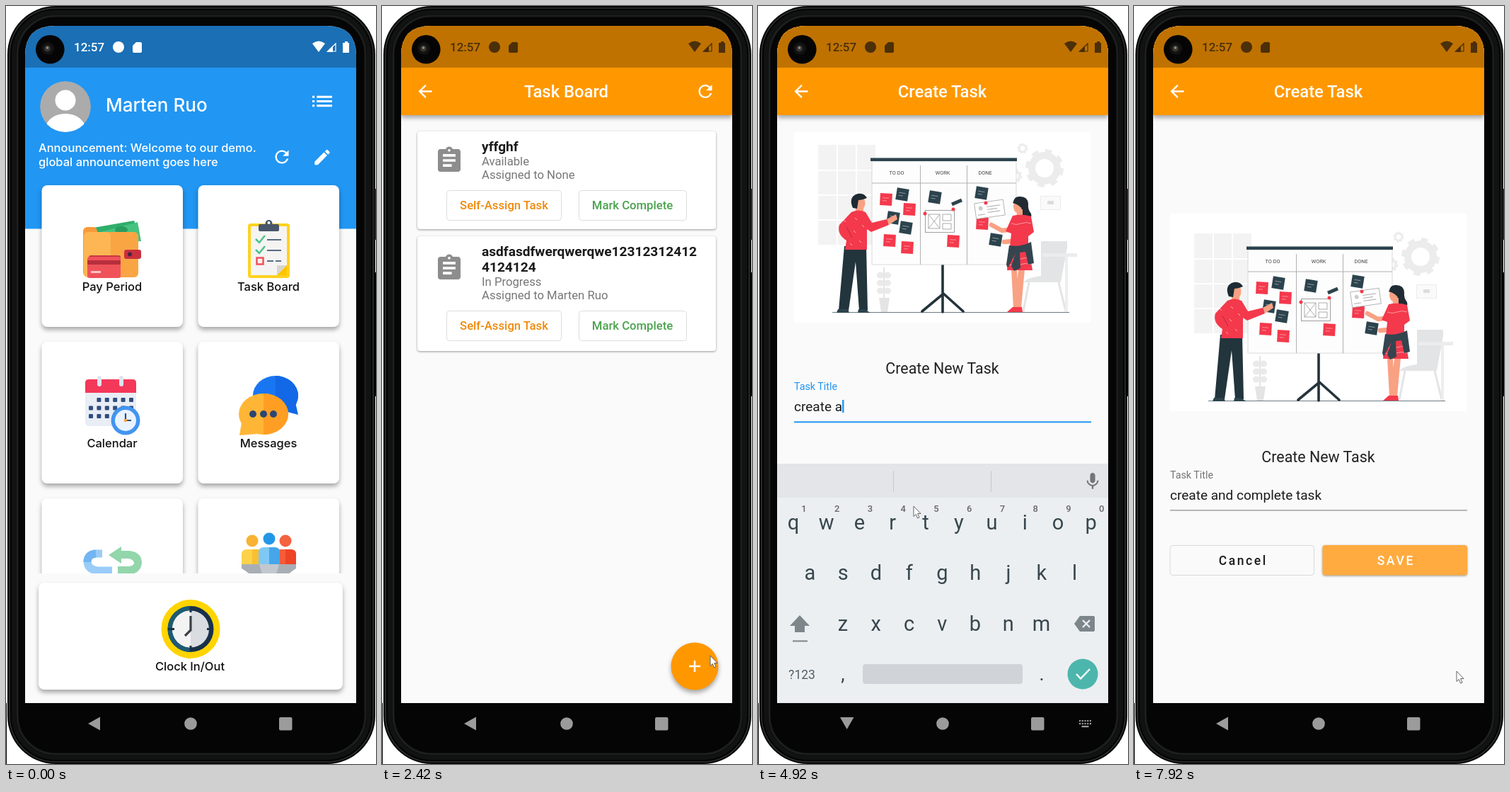
Write an HTML page that moves like this. It is 523 px wide and 1070 px high and loops after 8000 ms.

```html
<!DOCTYPE html>
<html lang="en">
<head>
<meta charset="utf-8">
<title>Task board demo</title>
<style>
  html, body { margin: 0; width: 100%; height: 100%; overflow: hidden; background: #fff; }
  svg { display: block; width: 100vw; height: 100vh; font-family: Roboto, sans-serif; }
  .inter { font-family: Inter, sans-serif; }
  .low { filter: drop-shadow(0 1.5px 1.5px #0006); }
  .high { filter: drop-shadow(0 4px 3px #0005); }
  .mid { text-anchor: middle; }
  .b5 { font-weight: 500; }
  .b7 { font-weight: 700; }
</style>
</head>
<body>
<svg id="stage" viewBox="0 0 523 1070" xmlns="http://www.w3.org/2000/svg"></svg>
<script>
const R = (x, y, w, h, fill, rx = 0, more = '') =>
  `<rect x="${x}" y="${y}" width="${w}" height="${h}" rx="${rx}" fill="${fill}" ${more}/>`;
const C = (x, y, r, fill, more = '') => `<circle cx="${x}" cy="${y}" r="${r}" fill="${fill}" ${more}/>`;
const E = (x, y, rx, ry, fill) => `<ellipse cx="${x}" cy="${y}" rx="${rx}" ry="${ry}" fill="${fill}"/>`;
const P = (d, fill, more = '') => `<path d="${d}" fill="${fill}" ${more}/>`;
const L = (d, color, w = 1, more = '') => P(d, 'none', `stroke="${color}" stroke-width="${w}" ${more}`);
const T = (x, y, size, text, fill, cls = '', more = '') =>
  `<text x="${x}" y="${y}" font-size="${size}" fill="${fill}" class="${cls}" ${more}>${text}</text>`;
const G = (inner, more = '') => `<g ${more}>${inner}</g>`;
const icon = (d, cx, cy, scale, fill) =>
  P(d, fill, `transform="translate(${cx} ${cy}) scale(${scale}) translate(-12 -12)"`);
const each = (list, fn) => [...list].map(fn).join('');

const ICON = {
  refresh: 'M17.65 6.35C16.2 4.9 14.21 4 12 4c-4.42 0-7.99 3.58-7.99 8s3.57 8 7.99 8c3.73 0 6.84-2.55 7.73-6h-2.08c-.82 2.33-3.04 4-5.65 4-3.31 0-6-2.69-6-6s2.69-6 6-6c1.66 0 3.14.69 4.22 1.78L13 11h7V4z',
  edit: 'M3 17.25V21h3.75L17.81 9.94l-3.75-3.75zM20.71 7.04c.39-.39.39-1.02 0-1.41l-2.34-2.34c-.39-.39-1.02-.39-1.41 0l-1.83 1.83 3.75 3.75z',
  back: 'M20 11H7.83l5.59-5.59L12 4l-8 8 8 8 1.41-1.41L7.83 13H20z',
  list: 'M3 7h2v2H3zM3 11h2v2H3zM3 15h2v2H3zM7 7h14v2H7zM7 11h14v2H7zM7 15h14v2H7z',
  task: 'M19 3h-4.18C14.4 1.84 13.3 1 12 1s-2.4.84-2.82 2H5c-1.1 0-2 .9-2 2v14c0 1.1.9 2 2 2h14c1.1 0 2-.9 2-2V5c0-1.1-.9-2-2-2zm-7 0c.55 0 1 .45 1 1s-.45 1-1 1-1-.45-1-1 .45-1 1-1zm2 14H7v-2h7zm3-4H7v-2h10zm0-4H7V7h10z',
  mic: 'M12 14c1.66 0 3-1.34 3-3V5c0-1.66-1.34-3-3-3S9 3.34 9 5v6c0 1.66 1.34 3 3 3zm5.3-3c0 3-2.54 5.1-5.3 5.1S6.7 14 6.7 11H5c0 3.41 2.72 6.23 6 6.72V21h2v-3.28c3.28-.48 6-3.3 6-6.72z'
};
const USER = 'Marten Ruo', TYPED = 'create and complete task';

function phone() {
  const ring = (inset, color, w) => R(2 + inset, inset, 520 - 2 * inset, 1070 - 2 * inset, 'none', 68 - inset,
    `stroke="${color}" stroke-width="${w}"`);
  return R(2, 0, 520, 1070, '#050505', 68) + ring(3, '#303232', 1.5) + ring(9, '#111212', 6) + ring(14, '#1d1e1e', 3)
    + R(0, 984, 1, 86, '#000') + R(521, 258, 2, 72, '#222') + R(521, 376, 2, 175, '#000');
}

function wallet() {
  return P('M118 314L181 303L190 329L126 334Z', '#2fae6b') + P('M134 319L186 305L191 332L140 335Z', '#46c380')
    + E(163, 316, 9, 5, '#2a9c5e') + R(109, 312, 20, 70, '#f79a3a', 6)
    + R(110, 319, 77, 64, '#f9a544', 6) + R(110, 319, 38, 64, '#fcb653', 6)
    + R(117, 352, 45, 26, '#c93843', 3) + R(115, 354, 47, 30, '#f0525a', 3)
    + R(115, 359, 47, 6, '#b72f3d') + R(120, 374, 14, 3, '#ffc4c4')
    + R(167, 344, 24, 13, '#c9303e', 3) + C(175, 350.5, 3, '#4b2440');
}
function clipboard() {
  return R(342, 307, 59, 77, '#ffd21f', 4) + P('M346 311H397V366L383 380H346Z', '#f5f4f2')
    + P('M383 380V366H397Z', '#d8d5d1') + P('M397 366V380H383Z', '#ffc400')
    + R(357, 308, 29, 10, '#48566b', 2) + C(371.5, 307, 5, '#48566b') + C(371.5, 306, 2, '#fff')
    + each([329, 344], y => L(`M353 ${y}L358 ${y + 5}L366 ${y - 5}`, '#4cc38a', 2.5))
    + R(354.5, 355.5, 9, 9, 'none', 0, 'stroke="#f0525a" stroke-width="2.5"')
    + L('M369 330H389M369 345H389M369 360H378M381 360H389', '#5a6c86', 2);
}
function calendar() {
  let dots = '';
  for (let r = 0; r < 3; r++) for (let c = 0; c < 6; c++)
    if (r || c) dots += R(117 + c * 11.4, 553 + r * 11.5, 6, 6, '#2f4d7d', 1);
  return R(112, 528, 72, 65, '#e9edf5', 5) + P('M112 546V532Q112 527 117 527H179Q184 527 184 532V546Z', '#f4385a')
    + each([132, 163], x => R(x - 3, 522, 6, 15, '#dfe5ef', 3)) + dots
    + C(169, 585, 20.5, '#4394f0') + C(169, 585, 15, '#e9f3ff')
    + L('M169 575V585H177', '#2f4d7d', 2.2) + C(169, 585, 2.3, '#f4a63c');
}
function messages() {
  return E(381, 550, 32, 28, '#1976f3') + P('M394 572L413 577L408 555Z', '#1268e6')
    + P('M381 522A32 28 0 0 1 381 578Z', '#1268e6')
    + E(364, 576, 35, 29, '#ffb636') + P('M330 606L334 582L355 604Z', '#ffb636')
    + P('M364 547A35 29 0 0 1 364 605Z', '#ff9e23') + each([349, 364, 378], x => C(x, 576, 5, '#2b4673'));
}
function swap() {
  return L('M136 773H127Q115 774 115 785Q116 796 130 797H150', '#9accf8', 11)
    + L('M127 773Q115 774 115 785', '#72b5f2', 11)
    + P('M145 775L163 763V769H174Q192 771 192 786Q191 799 178 802H158V791H174Q181 790 181 786Q180 781 173 780H163V787Z', '#93d6ab');
}
function team() {
  const person = (x, y, head, body, shade, w) => C(x, y, 8.5, head)
    + P(`M${x - w} ${y + 36}V${y + 19}Q${x - w} ${y + 12} ${x - w + 8} ${y + 12}H${x + w - 8}Q${x + w} ${y + 12} ${x + w} ${y + 19}V${y + 36}Z`, body)
    + P(`M${x} ${y + 12}H${x + w - 8}Q${x + w} ${y + 12} ${x + w} ${y + 19}V${y + 36}H${x}Z`, shade);
  return person(348, 755, '#f9b233', '#fbd24a', '#f9c02f', 15) + person(395, 755, '#f4623f', '#f75b39', '#ee4527', 15)
    + person(372, 752, '#2397e6', '#7fc8f5', '#45a6ea', 15)
    + P('M333 788H410V794Q398 801 394 810H350Q346 801 333 794Z', '#a9aeb5') + P('M358 788H386L382 802H362Z', '#c3c8ce');
}
function clock() {
  return C(261, 879.5, 41.5, '#ffd400') + C(261, 879.5, 32.5, '#18304a') + P('M261 847A32.5 32.5 0 0 0 261 912Z', '#1d5b73')
    + C(261, 879.5, 26, '#d9dce0') + P('M261 853.5A26 26 0 0 0 261 905.5Z', '#f3f3f3')
    + L('M261 848V856M261 903V911M229 879.5H238M284 879.5H293', '#18304a', 3)
    + L('M261 861V881L253 889', '#3b3f46', 3.2);
}

function home() {
  const card = (x, y, art, label) => R(x, y, 199.5, 200, '#fff', 8, 'class="high"') + art
    + T(x + 99.5, y + 149, 16.5, label, '#111', 'inter mid b5');
  return R(27, 28, 468, 956, '#fafafa') + R(27, 86, 468, 228.5, '#2196f3') + R(27, 28, 468, 59, '#1a6fb5')
    + G(C(84, 142, 36, '#ababab') + C(84, 133, 14.5, '#fff') + E(84, 173, 28, 21, '#fff'), 'clip-path="url(#face)"')
    + T(141, 148.5, 26, USER, '#fff', 'inter b5')
    + T(46, 206, 16.5, 'Announcement: Welcome to our demo.', '#fff', 'inter b5')
    + T(46, 226, 16.5, 'global announcement goes here', '#fff', 'inter b5')
    + icon(ICON.list, 447, 134.5, 1.55, '#fff')
    + icon(ICON.refresh, 390, 213, 1.19, '#fff') + icon(ICON.edit, 447, 213.5, 1.19, '#fff')
    + G(card(50.5, 253, wallet(), 'Pay Period') + card(271.5, 253, clipboard(), 'Task Board')
      + card(50.5, 474, calendar(), 'Calendar') + card(271.5, 474, messages(), 'Messages')
      + card(50.5, 695, swap(), '') + card(271.5, 695, team(), ''), 'clip-path="url(#list)"')
    + R(46, 814, 430, 151, '#fff', 8, 'class="high"') + clock()
    + T(260, 938, 16.5, 'Clock In/Out', '#111', 'inter mid b5');
}

const bar = title => R(27, 28, 468, 126, '#ff9800', 0, 'class="high"') + R(27, 28, 468, 59, '#bf7200')
  + icon(ICON.back, 61, 120.5, 1.19, '#fff') + T(260.5, 129, 23.8, title, '#fff', 'mid b5');

function board() {
  const task = (y, h, names, state, who) => {
    const n = y + 27 + (names.length - 1) * 22, edge = 'stroke="#ddd"';
    return R(50, y, 422, h, '#fff', 4, 'class="low"') + icon(ICON.task, 95, y + 41 + (names.length - 1) * 4, 1.78, '#8d8d8d')
      + each(names, (s, i) => T(141, y + 28 + i * 22, 19.1, s, '#1b1b1b', 'b7'))
      + T(141, n + 21, 16.7, state, '#777') + T(141, n + 40, 16.7, 'Assigned to ' + who, '#777')
      + R(91.5, n + 56.5, 162, 42, '#fff', 4, edge) + R(278.5, n + 56.5, 152, 42, '#fff', 4, edge)
      + T(172.5, n + 83, 16.7, 'Self-Assign Task', '#ef8a0c', 'mid b5')
      + T(354, n + 83, 16.7, 'Mark Complete', '#4ba34f', 'mid b5');
  };
  return R(27, 28, 468, 956, '#fafafa') + bar('Task Board') + icon(ICON.refresh, 457, 120.5, 1.19, '#fff')
    + task(177, 138, ['yffghf'], 'Available', 'None')
    + task(325, 162, ['asdfasdfwerqwerqwe12312312412', '4124124'], 'In Progress', USER)
    + C(442, 932, 33.5, '#ff9800', 'class="high"') + L('M434 932H450M442 924V940', '#fff', 2.4);
}

function picture() {
  const red = '#f4394c', ink = '#2c434d', pale = '#ececec', skin = '#f9a183';
  const gear = (x, y, r, w) => C(x, y, r, 'none', `stroke="${pale}" stroke-width="${w}"`)
    + C(x, y, r + w * .65, 'none', `stroke="${pale}" stroke-width="${w * .5}" stroke-dasharray="${(r + w * .65) * Math.PI / 8}"`);
  const note = (fill, tilt) => ([x, y]) => G(R(x - 8.5, y - 8.5, 17, 17, fill)
    + L(`M${x - 5} ${y - 2}h9M${x - 5} ${y + 2}h6`, '#fff8', .8), `transform="rotate(${tilt} ${x} ${y})"`);
  const round = 'stroke-linecap="round" stroke-linejoin="round"';
  const man = P('M122 464H153L155 555H143L138 486L128 555H114Z', '#22343c')
    + P('M113 553H127L129 558H111ZM142 553H150L159 558H141Z', ink)
    + P('M138 405H149V418H138Z', skin) + E(145, 403, 6.5, 9.5, skin)
    + P('M134 410Q128 396 138 391Q149 387 154 396Q147 399 142 399L140 411Z', '#1e2b33')
    + P('M132 416Q142 411 152 416L161 431L182 426L185 434L160 444L154 440L154 469H123L125 456Q111 447 115 434Z', red)
    + L('M125 437L133 452', '#b92a3c') + L('M121 427l3 3M137 424l3 3M147 434l3 3M135 442l3 3M143 456l3 3M130 460l3 3', '#ffb3b8')
    + P('M182 426L195 419L197 426L185 434Z', skin);
  const woman = P('M361 402Q362 393 371 394Q381 394 382 404Q381 412 386 418Q388 425 381 427Q372 426 370 418Z', '#202b33')
    + P('M366 412H374V424H366Z', skin) + E(367, 408, 6, 9, skin) + P('M360 403Q364 394 376 398L375 414Q371 406 360 403Z', '#202b33')
    + L('M362 440L345 442L330 434M384 438L371 456L348 458', skin, 6.5, round)
    + P('M358 497H366L369 551H361ZM368 497H377L372 551H363Z', skin) + P('M360 550H373L374 557H352Z', red)
    + P('M360 421Q374 418 386 422L390 444L382 450V462L388 498H352L356 466L358 446L350 443Z', red)
    + L('M358 432q7 3 14 0t14 0M356 482q8 3 15 0t15 0M354 490q8 3 16 0t16 0', '#ffb0b6', .8)
    + P('M355 463Q370 466 386 458L390 488L382 490L378 472L370 473L371 495L362 499L358 492L364 474L353 495L351 490Z', '#34454f');
  return R(51, 293, 419.5, 279, '#fff')
    + R(85, 321, 81, 141, '#f3f3f3') + L('M112 321V462M139 321V462M85 357H166M85 392H166M85 427H166', '#fff', 2)
    + gear(405, 354, 18, 10) + gear(374, 326, 5, 3) + gear(364, 365, 6, 4)
    + R(399.5, 393.5, 28, 19, '#fafafa', 0, `stroke="${pale}"`) + R(409, 400, 9, 5, '#ddd')
    + P('M400 457H437V466L428 515H376Q378 509 400 506Z', '#e3e4e5') + L('M383 515L375 556M425 515L435 556', '#e3e4e5', 3)
    + R(402, 474, 49, 5, pale) + R(434, 479, 4, 78, '#eee')
    + L('M178 494V540', '#e4e4e4', 2) + each([505, 516, 527], y => E(173, y, 5, 4.5, '#eaeaea') + E(183, y, 5, 4.5, '#eaeaea'))
    + P('M171 537H186L183 557H174Z', '#e4e4e4')
    + L('M105 557.5H440', ink, .7)
    + L('M261 490V532L232 556M261 530L290 556M261 530V557', '#24333b', 3.6, round)
    + R(161, 344, 204, 146, '#fdfdfd', 0, 'stroke="#dadada"') + R(159, 339.5, 207, 4.5, ink)
    + L('M161 375H365M229.5 350V490M295.5 350V490', '#aaa', .9)
    + each([[196, 'TO DO'], [261, 'WORK'], [321, 'DONE']], ([x, s]) => T(x, 363, 7.3, s, '#444', 'mid'))
    + each([[181, 398], [214, 412], [186, 456], [211, 466], [276, 457], [317, 432]], note(red, 3))
    + each([[204, 391], [191, 424], [209, 438], [250, 395], [316, 389], [336, 455]], note(ink, 9))
    + R(236.5, 413.5, 41, 31, '#fff', 0, 'stroke="#888" stroke-width=".8"')
    + L('M241 419H257V439H241ZL257 439M257 419L241 439M261 419H273V428H261ZM261 432H273V440H261Z', '#888', .7)
    + C(236, 418, 2.5, red) + C(276, 412, 2.5, red) + L('M274 405L288 399', ink, 5)
    + G(R(307, 401, 41, 22, '#fff', 0, 'stroke="#999" stroke-width=".7"') + C(315, 409, 3, '#ccc')
      + L('M310 418H320M324 408H343M324 412H338M324 416H342', '#999', .8), 'transform="rotate(-8 327 412)"')
    + C(322, 403, 2.5, red) + man + woman;
}

function create() {
  return R(27, 28, 468, 956, '#fafafa') + bar('Create Task')
    + G(G(picture() + T(260.5, 644, 21.4, 'Create New Task', '#212121', 'mid')
      + T(51, 697, 19, 'Organize storage rooms and fridges', '#9b9b9b', 'b7', 'id="hint"')
      + T(0, 0, 19.05, 'Task Title', '#757575', '', 'id="label"')
      + T(51, 697, 19.05, '', '#1c1c1c', '', 'id="entry"')
      + R(51, 681, 2.4, 18, '#2196f3', 0, 'id="caret"') + R(51, 711.3, 420, 2, '#2196f3', 0, 'id="rule"')
      + R(51, 761.5, 203.5, 42, '#fafafa', 4, 'stroke="#d9d9d9"')
      + T(154.3, 788.7, 17.5, 'Cancel', '#1c1c1c', 'mid b5', 'letter-spacing="2.6"')
      + R(266.5, 761, 204.5, 42.5, '#ffab40', 4, 'class="low"')
      + T(370.3, 788.7, 17.5, 'SAVE', '#fff', 'mid b5', 'letter-spacing="2.6"'), 'id="form"'), 'clip-path="url(#view)"');
}

function keyboard() {
  const ink = '#37474f', gray = '#7d868b';
  const row = (keys, x, y) => each(keys, (k, i) => T(x + i * 46.75, y, 29, k, ink, 'mid'));
  return R(27, 646, 468, 340, '#eceff1') + R(27, 646, 468, 48, '#e3e5e8')
    + L('M191.5 656V686M329.5 656V686', '#c6cacd') + icon(ICON.mic, 473, 671, 1.19, '#757575')
    + row('qwertyuiop', 50, 739) + row('asdfghjkl', 73.5, 810) + row('zxcvbnm', 120, 882)
    + each('1234567890', (k, i) => T(65 + i * 46.75, 714, 13, k, '#666', 'mid b5'))
    + P('M59 860L73 875H66V884H52V875H45Z', gray) + R(49, 895.5, 21, 2, gray)
    + P('M447 872L455 861H474Q476 861 476 863V881Q476 883 474 883H455Z', gray) + L('M459 867L469 877M469 867L459 877', '#eceff1', 2.4)
    + T(62, 950, 17.5, '?123', '#546068', 'mid') + T(120, 952, 27, ',', ink, 'mid') + T(401, 952, 27, '.', ink, 'mid')
    + R(148, 929, 226, 28, '#d0d4d8', 4) + C(459, 943, 21.5, '#4db6ac') + L('M450 943L456 949.5L469 936', '#fff', 2.4);
}

function statusBar() {
  const ink = 'currentColor';
  return T(96, 64, 17, '12:57', ink, 'b5') + C(159, 58, 8, ink)
    + P('M184 51H190Q192 51 192 53V64Q192 66 190 66H181Q179 66 179 64V56Z', ink)
    + P('M433 53Q442 46 451 53L442 65Z', ink)
    + P('M462 56V65H453Z', ink) + L('M466 53V64H455Z', ink, 1.2)
    + P('M479 50H483V52H485V66H476V52H479Z', ink);
}

function navBar() {
  const gray = '#9b9b9b';
  const dots = each([0, 1, 2, 3, 4], i => each([1008, 1012], y => R(454 + i * 3.7, y, 2.2, 2.2, gray)));
  return P('', gray, 'id="backKey"') + C(261, 1013, 8.8, gray) + R(386, 1004, 18.5, 18.5, gray, 2)
    + G(dots + R(457.5, 1016, 10, 2.2, gray), 'id="kbKey"');
}

document.getElementById('stage').innerHTML = `<defs>
  <clipPath id="screen"><path d="M27 984V70Q27 28 69 28H453Q495 28 495 70V984Z"/></clipPath>
  <clipPath id="face"><circle cx="84" cy="142" r="36"/></clipPath>
  <clipPath id="list"><rect x="27" y="240" width="468" height="561"/></clipPath>
  <clipPath id="view"><rect id="viewport" x="27" y="178" width="468" height="782"/></clipPath></defs>`
  + phone() + G(G(home(), 'id="home"') + G(board(), 'id="board"') + G(create(), 'id="create"')
    + G(keyboard(), 'id="keys"') + G(statusBar(), 'id="status"'), 'clip-path="url(#screen)"')
  + C(62.3, 61.3, 20.3, '#050505') + C(59, 60, 9, '#121212') + C(58.5, 60, 4.5, '#3a3530') + C(58.5, 59, 1.8, '#968c84')
  + navBar()
  + P('M0 0V14.5L3.3 11.5L5.6 17L8 16L5.7 10.5H10Z', '#fff', 'id="mouse" stroke="#555" stroke-width=".9"');

const $ = Object.fromEntries([...document.querySelectorAll('[id]')].map(e => [e.id, e]));
const set = (el, attrs) => { for (const k in attrs) el.setAttribute(k, attrs[k]); };
const show = (el, on) => { el.style.display = on ? '' : 'none'; };
const part = (t, a, b) => Math.min(1, Math.max(0, (t - a) / (b - a)));
const out = p => 1 - (1 - p) ** 3;
const smooth = p => p * p * (3 - 2 * p);

const LOOP = 8000, FOCUS = 3500, BLUR = 7720, TYPE = 4220, PER_KEY = 93;
const PATH = [[1000, 523, 330], [1330, 458, 285], [1580, 372, 362], [1980, 372, 362], [2330, 464, 917],
  [2720, 464, 917], [3280, 220, 706], [6750, 220, 706], [7400, 456, 939], [LOOP, 456, 939]];

function mouseAt(t) {
  const i = PATH.findIndex(p => p[0] > t), [a, b] = [PATH[i - 1], PATH[i]];
  const p = smooth(part(t, a[0], b[0]));
  return [a[1] + (b[1] - a[1]) * p, a[2] + (b[2] - a[2]) * p];
}

function enter(el, t, start) {
  const p = part(t, start, start + 300);
  show(el, p > 0);
  set(el, { opacity: p * p, transform: `translate(0 ${240 * (1 - out(p))})` });
}

function draw(t) {
  enter($.board, t, 1780);
  enter($.create, t, 2660);
  show($.home, t < 2080);
  $.status.style.color = t < 1880 ? '#fff' : '#4b2f08';

  const up = out(part(t, 3900, 4150)) - smooth(part(t, 7580, 7780));
  const lift = out(part(t, 4000, 4350)) - smooth(part(t, 7620, 7880));
  const open = t > 4000 && t < BLUR;
  show($.keys, up > 0);
  set($.keys, { transform: `translate(0 ${340 * (1 - up)})` });
  set($.form, { transform: `translate(0 ${-125 * lift})` });
  set($.viewport, { height: 782 - 338 * up });
  set($.backKey, { d: open ? 'M116 1004H135.5L125.7 1021Z' : 'M116 1013L133 1003.5V1022.5Z' });
  show($.kbKey, t > FOCUS + 100 && t < 7860);

  const focus = t >= FOCUS && t < BLUR, float = smooth(part(t, FOCUS, FOCUS + 200));
  const count = t < TYPE ? 0 : 1 + Math.floor((t - TYPE) / PER_KEY);
  const text = TYPED.slice(0, count);
  if ($.entry.textContent !== text) $.entry.textContent = text;
  set($.label, {
    transform: `translate(51 ${697 - 30 * float}) scale(${1 - .25 * float})`,
    fill: focus ? '#2196f3' : '#757575'
  });
  set($.hint, { opacity: float * (1 - part(t, TYPE, TYPE + 200)) });
  set($.rule, { height: focus ? 2 : 1.2, fill: focus ? '#2196f3' : '#8a8a8a' });
  const done = TYPE + PER_KEY * TYPED.length;
  const idle = t < TYPE ? t - FOCUS : Math.max(0, t - done);
  show($.caret, focus && Math.floor(idle / 500) % 2 === 0);
  set($.caret, { x: 51 + (text ? $.entry.getComputedTextLength() : 0) });

  show($.mouse, t >= PATH[0][0]);
  if (t >= PATH[0][0]) set($.mouse, { transform: `translate(${mouseAt(t)})` });
}

const begin = performance.now();
function tick() {
  draw((performance.now() - begin) % LOOP);
  requestAnimationFrame(tick);
}
tick();
</script>
</body>
</html>
```
